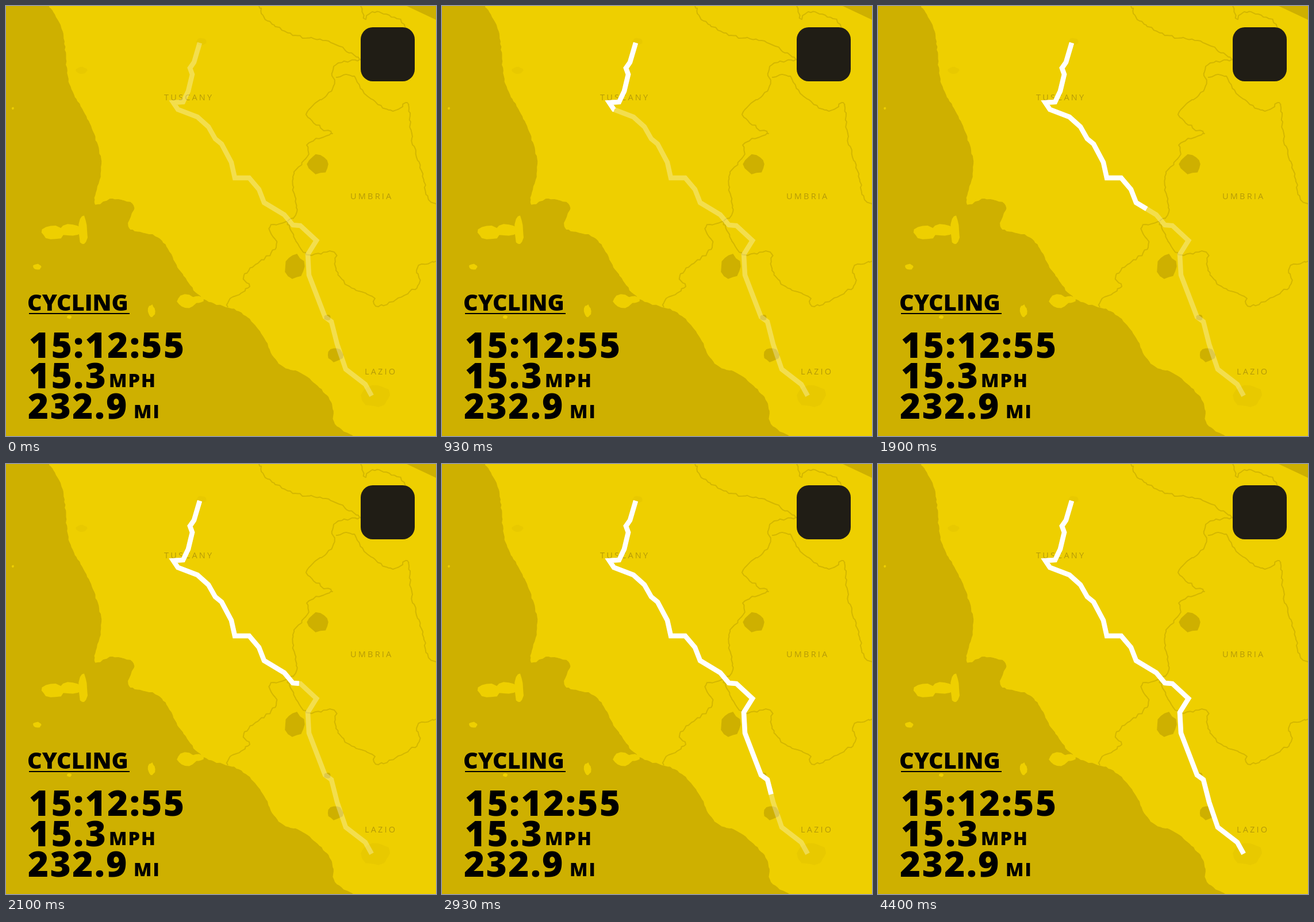
An HTML page with a canvas for the animation above (4910 ms loop, 748 by 748 pixels).

```html
<!DOCTYPE html>
<html lang="en">
<head>
<meta charset="utf-8">
<title>Cycling route</title>
<style>
html, body { margin: 0; width: 100%; height: 100%; overflow: hidden; background: #eecf00; }
canvas { display: block; width: 100vw; height: 100vh; }
</style>
</head>
<body>
<canvas id="stage" width="748" height="748"></canvas>
<script>
const SIZE = 748, LOOP = 4910, DRAW_START = 400, DRAW_TIME = 3000;
const LAND = '#eecf00', SEA = '#ceb000', BORDER = '#d4b700', LABEL = '#b59a08';
const ctx = document.getElementById('stage').getContext('2d');

let seed = 11;
const random = () => (seed = (seed * 16807) % 2147483647) / 2147483647;
const spread = size => (random() - 0.5) * size;

const points = text => text.split(' ').map(p => p.split(',').map(Number));

function toPath(pts) {
  const path = new Path2D();
  pts.forEach(p => path.lineTo(...p));
  return path;
}

// Catmull-Rom interpolation of one coordinate.
const blend = (a, b, c, d, t) =>
  b + t * (c - a + t * (2 * a - 5 * b + 4 * c - d + t * (3 * (b - c) + d - a))) / 2;

// A smooth line through the key points, made uneven by seeded wobble.
function natural(text, wobble) {
  const keys = points(text), out = [keys[0]];
  for (let i = 0; i < keys.length - 1; i++) {
    const b = keys[i], c = keys[i + 1];
    const a = keys[i - 1] || b, d = keys[i + 2] || c;
    const steps = Math.ceil(Math.hypot(c[0] - b[0], c[1] - b[1]) / 5);
    for (let k = 1; k <= steps; k++) {
      const size = k < steps ? wobble : 0;
      out.push([0, 1].map(n => blend(a[n], b[n], c[n], d[n], k / steps) + spread(size)));
    }
  }
  return out;
}

// An uneven ellipse, for lakes and islands.
function blot([x, y, rx, ry]) {
  const pts = [];
  for (let i = 0; i < 14; i++) {
    const angle = i / 14 * Math.PI * 2, r = 1 + spread(0.25);
    pts.push([x + Math.cos(angle) * rx * r, y + Math.sin(angle) * ry * r]);
  }
  return toPath(pts);
}

const coast = natural('75,0 99,45 110,135 144,200 166,275 154,343 185,335 222,347 214,386 268,405 304,462 344,510 405,531 442,566 474,622 512,638 545,664 567,692 572,727 604,748', 2);
const sea = [
  toPath([...coast, [0, SIZE], [0, 0]]),
  toPath([[697, 0], [SIZE, 24], [SIZE, 0]])
];

const borders = [
  '440,0 455,26 503,51 556,60 604,84 618,93',
  '617,0 625,23 637,10 680,22 698,40',
  '618,93 570,105 568,144 524,184 547,212 568,222 527,238 524,262 499,297 506,358 490,374',
  '574,124 606,122 623,152 673,183 698,168 706,230 722,285 735,337 748,344',
  '490,376 459,385 470,420 414,468 424,488 388,512 386,524',
  '490,376 510,418 528,433 571,428 574,460 598,488 637,505 648,523 716,487 716,455 748,444'
].map(text => toPath(natural(text, 4)));

const lakes = [
  [543, 275, 19, 17], [502, 453, 17, 20], [573, 607, 13, 12], [559, 542, 6, 5]
].map(blot);

const islands = [
  [82, 394, 20, 12], [112, 390, 20, 10], [134, 391, 8, 25], [54, 454, 7, 5],
  [253, 531, 6, 11], [315, 514, 17, 12], [333, 511, 12, 6], [110, 541, 4, 3], [12, 178, 2, 2]
].map(blot);

const towns = [[340, 62, 9, 6], [131, 112, 10, 6], [642, 677, 24, 20]].map(blot);

const route = points('337,64 327,98 320,108 324,119 317,148 308,167 291,168 299,180 333,193 352,210 364,231 375,240 392,272 398,299 423,299 440,319 449,342 484,363 499,381 512,382 540,408 525,432 527,468 555,541 566,549 576,588 591,632 625,658 636,678');
const routePath = toPath(route);
const routeLength = route.slice(1).reduce(
  (sum, [x, y], i) => sum + Math.hypot(x - route[i][0], y - route[i][1]), 0);

function fillAll(paths, color) {
  ctx.fillStyle = color;
  paths.forEach(p => ctx.fill(p));
}

function write(text, x, y, size, weight, spacing, color) {
  ctx.font = `${weight} ${size}px "Open Sans", sans-serif`;
  ctx.letterSpacing = spacing + 'px';
  ctx.fillStyle = color;
  ctx.fillText(text, x, y);
}

const label = (text, x, y) => write(text, x, y, 14.5, 400, 3.2, LABEL);
const figure = (text, x, y) => write(text, x, y, 61.5, 800, 2.6, '#000');
const unit = (text, x, y) => write(text, x, y, 32.5, 800, 2, '#000');

function drawMap() {
  ctx.fillStyle = LAND;
  ctx.fillRect(0, 0, SIZE, SIZE);
  fillAll(towns, 'rgba(190,160,0,.13)');

  ctx.lineWidth = 2;
  ctx.lineJoin = 'round';
  ctx.strokeStyle = BORDER;
  borders.forEach(b => ctx.stroke(b));

  fillAll(sea, SEA);
  fillAll(lakes, SEA);
  fillAll(islands, LAND);

  label('TUSCANY', 275, 164);
  label('UMBRIA', 599, 336);
  label('LAZIO', 624, 641);
}

function drawRoute(progress) {
  ctx.lineWidth = 8.5;
  ctx.lineJoin = 'miter';
  ctx.strokeStyle = 'rgba(255,255,255,.3)';
  ctx.stroke(routePath);
  if (progress <= 0) return;
  ctx.strokeStyle = '#fff';
  ctx.setLineDash([routeLength * progress, routeLength * 2]);
  ctx.stroke(routePath);
  ctx.setLineDash([]);
}

function drawStats() {
  write('CYCLING', 37, 530, 39.5, 800, 0, '#000');
  ctx.fillRect(40, 534, 175, 2);
  figure('15:12:55', 40, 612);
  figure('15.3', 40, 665);
  figure('232.9', 38, 718);
  unit('MPH', 179, 663);
  unit('MI', 222, 717);
}

function drawBadge() {
  ctx.fillStyle = '#201d15';
  ctx.beginPath();
  ctx.roundRect(617, 37, 94, 94, 21);
  ctx.fill();
}

const start = performance.now();
function frame() {
  const t = (performance.now() - start) % LOOP;
  drawMap();
  drawRoute(Math.min(1, Math.max(0, (t - DRAW_START) / DRAW_TIME)));
  drawStats();
  drawBadge();
  requestAnimationFrame(frame);
}
frame();
</script>
</body>
</html>
```
